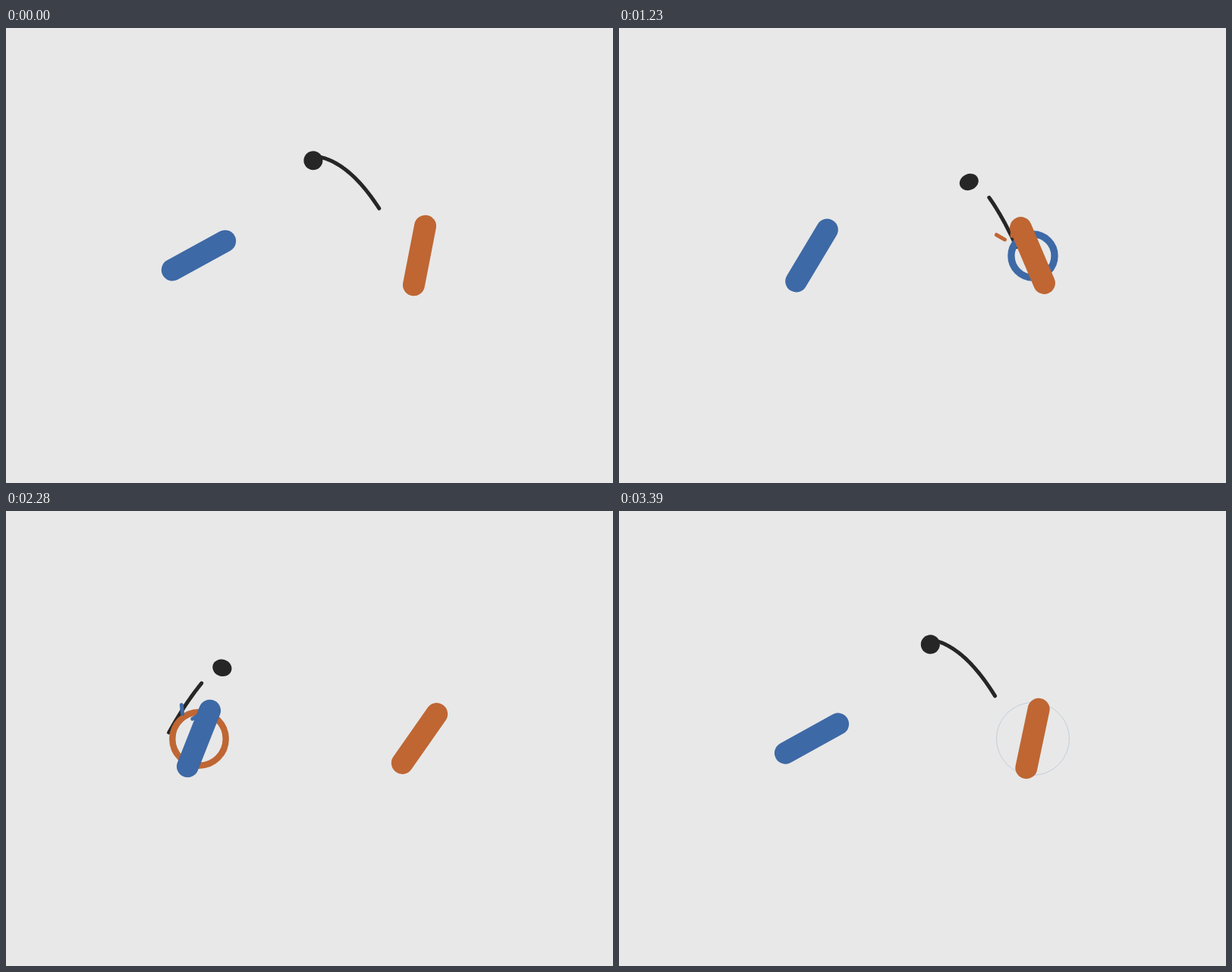
Animation, 800 px wide and 600 px high, one loop 3420 ms. Source, as an HTML page with a canvas:

```html
<!DOCTYPE html>
<html lang="en">
<head>
<meta charset="utf-8">
<title>Paddle rally</title>
<style>
  html, body { margin: 0; width: 100%; height: 100%; overflow: hidden; background: #e8e8e8; }
  canvas { display: block; }
</style>
</head>
<body>
<canvas id="stage" width="800" height="600"></canvas>
<script>
const ctx = document.getElementById('stage').getContext('2d');
const LOOP = 3420, RING_LIFE = 430, SPARK_LIFE = 240;
const BLUE = '#3d69a6', ORANGE = '#bf6633', INK = '#262626';

// Smooth swing through [time, degrees] poses, at rest at both ends and every turn.
function swing(poses) {
  const slope = i => (poses[i + 1][1] - poses[i][1]) / (poses[i + 1][0] - poses[i][0]);
  const speeds = poses.map((_, i) => {
    if (i === 0 || i === poses.length - 1) return 0;
    const a = slope(i - 1), b = slope(i);
    return a * b <= 0 ? 0 : 2 * a * b / (a + b);
  });
  return t => {
    const i = poses.findIndex(p => p[0] > t) - 1;
    const [t0, a] = poses[i], [t1, b] = poses[i + 1];
    const h = t1 - t0, u = (t - t0) / h, v = 1 - u;
    return a * v * v * (1 + 2 * u) + b * u * u * (3 - 2 * u)
      + h * u * v * (speeds[i] * v - speeds[i + 1] * u);
  };
}

const left = {
  x: 254, color: BLUE, ring: ORANGE, sparks: [-30, -96],
  angle: swing([[0, -28.7], [510, 99], [750, 149], [1710, 93], [2280, 291.3],
    [2670, 404], [LOOP, 511.3]])
};
const right = {
  x: 545, color: ORANGE, ring: BLUE, sparks: [-150, -84],
  angle: swing([[0, 101], [510, 16.3], [1080, 9], [1230, -112.6], [1710, -247.4],
    [2280, -415], [2670, -408.1], [LOOP, -619]])
};

// path: quadratic Bezier; pace skews the timing, drag holds the trail's tail back,
// sag lowers the ball early in its flight.
const flights = [
  { from: left, start: 424, time: 710, pace: 1, drag: 2.7, sag: 0, tilt: 32,
    path: [278, 300, 413, 30, 535, 300], spark: [277, 302], reach: 41 },
  { from: right, start: 1144, time: 650, pace: .8, drag: 3.2, sag: 20, tilt: -24,
    path: [528, 298, 417, 41, 268, 298], spark: [517, 284], reach: 27 },
  { from: left, start: 2160, time: 760, pace: 1, drag: 3.3, sag: 15, tilt: 17,
    path: [212, 297, 358, 29, 545, 285], spark: [234, 281], reach: 27 },
  { from: right, start: 2990, time: 850, pace: 1.14, drag: 2.7, sag: 22, tilt: -20,
    path: [525, 300, 405, 37, 262, 300], spark: [517, 284], reach: 27 }
];

// Fast off the paddle, slow at the top, fast again at the end.
function progress(f, age) {
  const s = 2 * Math.min(1, age / f.time) ** f.pace - 1;
  return .5 + .5 * (.55 * s + .45 * s ** 3);
}

function pointOn([x0, y0, x1, y1, x2, y2], u) {
  const v = 1 - u;
  return [v * v * x0 + 2 * u * v * x1 + u * u * x2, v * v * y0 + 2 * u * v * y1 + u * u * y2];
}

function polar([x, y], r, deg) {
  const a = deg * Math.PI / 180;
  return [x + r * Math.cos(a), y + r * Math.sin(a)];
}

function stroke(points, width, color) {
  ctx.beginPath();
  points.forEach(p => ctx.lineTo(...p));
  ctx.lineWidth = width;
  ctx.strokeStyle = color;
  ctx.stroke();
}

function drawTrail(f, age) {
  const u = progress(f, age);
  const tail = u ** f.drag;
  const head = u - .17 * Math.max(0, 1 - age / 250);
  if (head <= tail) return;
  const points = [];
  for (let i = 0; i <= 40; i++) points.push(pointOn(f.path, tail + (head - tail) * i / 40));
  stroke(points, 5, INK);
}

function drawBall(f, age) {
  if (age >= f.time) return;
  const u = progress(f, age);
  const [x, y] = pointOn(f.path, u);
  const squash = .25 * Math.max(0, 1 - age / 220);
  ctx.beginPath();
  ctx.ellipse(x, y + f.sag * (1 - u) ** 2, 12.5 + squash * 2, 12.5 * (1 - squash),
    f.tilt * Math.PI / 180, 0, 7);
  ctx.fillStyle = INK;
  ctx.fill();
}

function drawRing(f, age) {
  const rest = 1 - age / RING_LIFE;
  if (rest <= 0) return;
  ctx.beginPath();
  ctx.arc(f.from.x + .5, 300.5, 48 * (1 - rest ** 4), 0, 7);
  ctx.lineWidth = 11.7 * rest;
  ctx.strokeStyle = f.from.ring;
  ctx.globalAlpha = Math.min(1, rest * 4);
  ctx.stroke();
  ctx.globalAlpha = 1;
}

function drawSparks(f, age) {
  const q = age / SPARK_LIFE;
  if (q >= 1) return;
  const ends = [q, 1 - (1 - q) ** 4];
  for (const deg of f.from.sparks) {
    stroke(ends.map(e => polar(f.spark, f.reach * e, deg)), 5, f.from.color);
  }
}

function drawPaddle(p, t) {
  const a = p.angle(t), mid = [p.x, 300];
  stroke([polar(mid, -39.5, a), polar(mid, 39.5, a)], 29, p.color);
}

function draw(t) {
  ctx.fillStyle = '#e8e8e8';
  ctx.fillRect(0, 0, 800, 600);
  ctx.lineCap = ctx.lineJoin = 'round';
  for (const layer of [drawTrail, drawBall, drawRing, drawSparks]) {
    for (const f of flights) layer(f, (t - f.start + LOOP) % LOOP);
  }
  drawPaddle(left, t);
  drawPaddle(right, t);
}

const begin = performance.now();
function tick() {
  draw((performance.now() - begin) % LOOP);
  requestAnimationFrame(tick);
}
tick();
</script>
</body>
</html>
```
